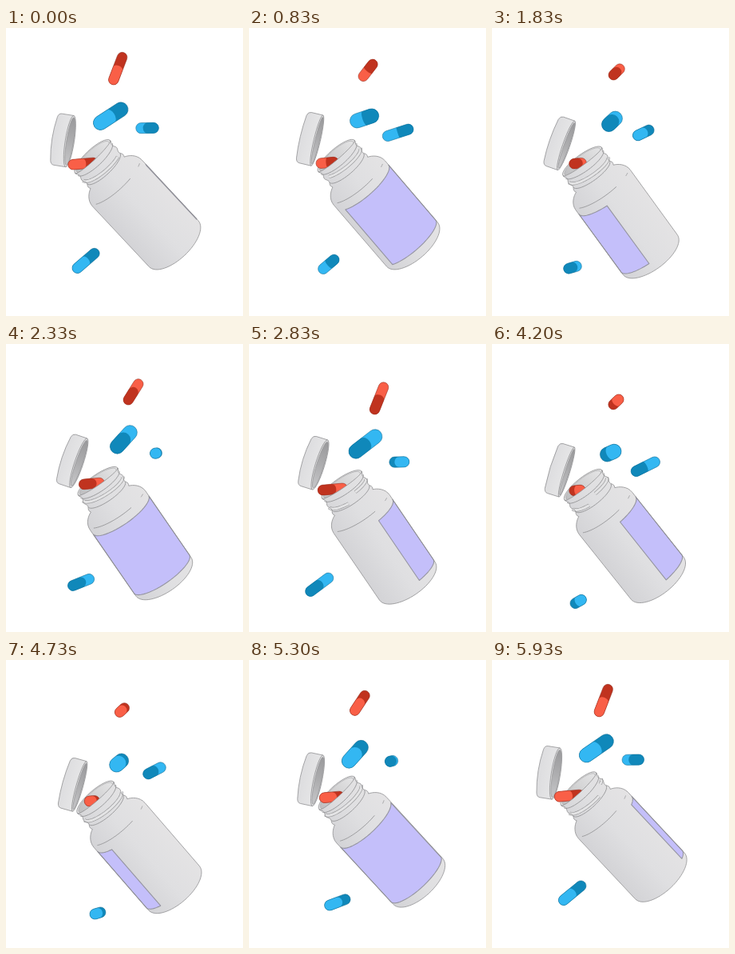
Animation of 297 by 360 pixels, one loop 6010 ms. Source, as an HTML page with a canvas:

```html
<!DOCTYPE html>
<html lang="en">
<head>
<meta charset="utf-8">
<title>Pill bottle</title>
<style>
html, body { margin: 0; width: 100%; height: 100%; overflow: hidden; background: #fff; }
canvas { display: block; width: 297px; height: 360px; }
</style>
</head>
<body>
<canvas id="stage"></canvas>
<script>
const LOOP = 6010, STEPS = 120, DEG = Math.PI / 180;
const canvas = document.getElementById('stage');
const ctx = canvas.getContext('2d');
const ratio = Math.max(1, window.devicePixelRatio || 1);
canvas.width = 297 * ratio;
canvas.height = 360 * ratio;

const RED = { light: '#f95f47', dark: '#c0331f', line: '#8c2a1c' };
const BLUE = { light: '#33b7f2', dark: '#1088ba', line: '#0c668c' };
const LINE = '#8b8b8d';
const LABEL_WIDTH = 175, SQUASH = .3, LIP_SQUASH = .14;

const cos = deg => Math.cos(deg * DEG);
const sin = deg => Math.sin(deg * DEG);

// A closed sway: one swing per loop plus a smaller one at double speed.
const wave = (mid, size, phase, size2 = 0, phase2 = 0) => turn =>
  mid + size * cos(turn - phase) + size2 * cos(2 * turn - phase2);

// Pills drift along x and y, tumble end over end and rock around their tilt.
const PILLS = [
  { hue: RED, r: 6.3, len: 30, lag: 0, seam: 35, tilt: wave(55, 0, 0, 14, 0),
    x: wave(152, 12, 170, 3, 90), y: wave(60.5, 12, 215, 4, 90) },
  { hue: BLUE, r: 9, len: 30.5, lag: 0, seam: 35, tilt: wave(33, 0, 0, 15, 270),
    x: wave(143.5, 8, 160, 5.5, 150), y: wave(121.5, 12, 225, 4, 135) },
  { hue: BLUE, r: 6.6, len: 27, lag: 55, seam: -125, tilt: wave(15, 0, 0, 14, 180),
    x: wave(186.5, 6, 175, 4.5, 140), y: wave(138, 15, 210, 7, 90) },
  { hue: BLUE, r: 6.5, len: 28, lag: 0, seam: 35, tilt: wave(31, 0, 0, 15, 50),
    x: wave(101, 8, 320, 7.5, 200), y: wave(303.5, 12, 240, 7, 160) }
];
const SPILLING = { hue: RED, r: 6.4, len: 25, lag: 0, seam: 35, tilt: wave(5, 0, 0),
  x: wave(103.5, 4, 200, 4, 220), y: wave(175, 9, 220, 3, 60) };

const CAP = {
  x: wave(88.5, 4.5, 190, 4.3, 190), y: wave(149.5, 9, 235, 2.8, 190),
  lean: wave(15.2, 4, 170, 2.3, 190), open: wave(4.8, 0, 0, 1, -30), depth: 19
};

const BOTTLE = {
  x: wave(112.5, 4, 190), y: wave(169, 9.5, 213),
  footX: wave(207, 7.5, -39), footY: wave(286.5, 15, 201),
  wobble: wave(94, 12, 20, 15, 170), spinStep: 11.88
};

function paint(fill, line, width = .7) {
  if (fill) { ctx.fillStyle = fill; ctx.fill(); }
  if (line) { ctx.strokeStyle = line; ctx.lineWidth = width; ctx.stroke(); }
}

function shade(x0, y0, x1, y1, ...colours) {
  const g = ctx.createLinearGradient(x0, y0, x1, y1);
  colours.forEach((c, i) => g.addColorStop(i / (colours.length - 1), c));
  return g;
}

function oval(x, y, rx, ry) {
  ctx.beginPath();
  ctx.ellipse(x, y, rx, ry, 0, 0, 2 * Math.PI);
}

function drawPill({ hue, r, len, lag, seam, tilt, x, y }, turn) {
  const reach = len / 2 * cos(turn - lag);
  const depth = sin(turn - seam);
  const darkNear = depth > 0;
  const half = Math.abs(reach);
  const flipped = (reach < 0) === darkNear;
  ctx.save();
  ctx.translate(x(turn), y(turn));
  ctx.rotate(-tilt(turn) * DEG + (flipped ? Math.PI : 0));
  const capsule = () => {
    ctx.beginPath();
    ctx.arc(half, 0, r, -Math.PI / 2, Math.PI / 2);
    ctx.arc(-half, 0, r, Math.PI / 2, Math.PI * 1.5);
    ctx.closePath();
  };
  capsule();
  paint(darkNear ? hue.light : hue.dark);
  // The half nearer to the viewer covers the seam.
  ctx.beginPath();
  ctx.arc(half, 0, r, -Math.PI / 2, Math.PI / 2);
  ctx.ellipse(0, 0, r * Math.abs(depth), r, 0, Math.PI / 2, Math.PI * 1.5);
  ctx.closePath();
  paint(darkNear ? hue.dark : hue.light);
  capsule();
  paint(null, hue.line, .5);
  ctx.restore();
}

function drawCap(turn) {
  const h = 32.5, { depth } = CAP, open = CAP.open(turn);
  ctx.save();
  ctx.translate(CAP.x(turn), CAP.y(turn));
  ctx.rotate(CAP.lean(turn) * DEG);
  ctx.beginPath();
  ctx.moveTo(0, -h);
  ctx.lineTo(4 - depth, -h);
  ctx.quadraticCurveTo(-depth, -h, -depth - 1, -h + 5);
  ctx.quadraticCurveTo(-depth - open, 0, -depth - 1, h - 5);
  ctx.quadraticCurveTo(-depth, h, 4 - depth, h);
  ctx.lineTo(0, h);
  ctx.closePath();
  paint(shade(-depth, 0, 0, 0, '#dedee0', '#e6e6e7'), LINE);
  oval(0, 0, open, h);
  paint('#dcdcdd', LINE);
  oval(.4, 0, open - 1.3, h - 2.5);
  paint(shade(0, -h, 0, h, '#98989a', '#adadaf', '#c8c8ca'), '#8f8f91', .6);
  ctx.restore();
}

// Adds the part of a ring around the bottle between two angles; it may climb.
function ring(s, r, from, to, { squash = SQUASH, climb = 0 } = {}) {
  for (let i = 0; i <= 24; i++) {
    const a = from + (to - from) * i / 24;
    ctx.lineTo(r * sin(a), s + climb * (a - from) + squash * r * cos(a));
  }
}

function crease(s, r, from, to) {
  ctx.beginPath();
  ring(s, r, from, to);
  paint(null, '#9b9b9d', .9);
}

function bodySide(side) {
  // Neck with two ridges, shoulder, then the wall down to the rounded foot.
  const neck = s => 28.8 + 1.1 * cos(s * 30);
  for (let s = 0; s <= 27; s += 1.5) ctx.lineTo(side * neck(s), s);
  ctx.bezierCurveTo(side * 34, 29, side * 42.3, 35, side * 42.4, 45);
  ctx.lineTo(side * 42.2, 148);
  ctx.bezierCurveTo(side * 42, 160, side * 22, 168, 0, 168);
}

function bodyPath() {
  const path = side => {
    ctx.moveTo(0, 30 * LIP_SQUASH);
    ring(0, 30, 0, side * 90, { squash: LIP_SQUASH });
    bodySide(side);
    ctx.lineTo(0, 30 * LIP_SQUASH);
  };
  ctx.beginPath();
  path(-1);
  path(1);
}

function outlineBody() {
  ctx.beginPath();
  for (const side of [-1, 1]) {
    ctx.moveTo(0, 30 * LIP_SQUASH);
    ring(0, 30, 0, side * 90, { squash: LIP_SQUASH });
    bodySide(side);
  }
  paint(null, LINE);
}

// Calls show(from, to) for the parts of a turning band that face the viewer.
function facing(start, width, limit, show) {
  const first = ((start % 360) + 360) % 360;
  for (const a of [first - 360, first]) {
    const from = Math.max(-limit, a), to = Math.min(limit, a + width);
    if (to - from > 7) show(from, to, from - a);
  }
}

function drawThread(spin) {
  const climb = 7 / 330;
  facing(spin, 330, 88, (from, to, passed) => {
    ctx.beginPath();
    ring(9 + climb * passed, 29, from, to, { climb });
    paint(null, '#9b9b9d', 4.4);
    paint(null, '#e4e4e5', 3);
  });
}

function drawLabel(spin) {
  facing(spin, LABEL_WIDTH, 90, (from, to) => {
    ctx.beginPath();
    ring(52, 42.2, from, to);
    ring(144, 42.2, to, from);
    ctx.closePath();
    paint('#c4bffa', '#9595a0', 1.1);
  });
}

function drawBottle(turn, n) {
  const x = BOTTLE.x(turn), y = BOTTLE.y(turn);
  const dx = BOTTLE.footX(turn) - x, dy = BOTTLE.footY(turn) - y;
  const length = Math.hypot(dx, dy), ax = dx / length, ay = dy / length, k = length / 152;
  const spin = BOTTLE.wobble(turn) + BOTTLE.spinStep * n - 8;
  const place = () => ctx.transform(ay, -ax, ax * k, ay * k, x, y);

  ctx.save();
  place();
  oval(0, 0, 30, 30 * SQUASH);
  paint('#e3e3e4', LINE);
  oval(0, .3, 27.5, 27.5 * SQUASH);
  paint(shade(-28, 0, 28, 0, '#bdbdbf', '#d2d2d3', '#e4e4e5'), '#a5a5a7', .6);
  ctx.restore();

  drawPill(SPILLING, turn);

  ctx.save();
  place();
  ctx.lineJoin = 'round';
  bodyPath();
  paint(shade(-43, 0, 43, 0, '#d3d3d6', '#dfdfe1', '#e4e3e4'));
  drawThread(spin);
  crease(4, 29.5, -88, 88);
  crease(20, 28, -88, 88);
  crease(40, 42.4, -62, 22);
  crease(40, 42.4, 52, 62);
  drawLabel(spin);
  outlineBody();
  ctx.restore();
}

function draw(n) {
  const turn = n * 360 / STEPS;
  ctx.setTransform(ratio, 0, 0, ratio, 0, 0);
  ctx.fillStyle = '#fff';
  ctx.fillRect(0, 0, 297, 360);
  drawCap(turn);
  drawBottle(turn, n);
  PILLS.forEach(pill => drawPill(pill, turn));
}

// Two steps per 100 ms: one holds 30 ms, the next 70 ms.
function stepAt(ms) {
  const t = ms % LOOP;
  return Math.min(STEPS - 1, 2 * Math.floor(t / 100) + (t % 100 >= 30 ? 1 : 0));
}

function tick() {
  draw(stepAt(performance.now()));
  requestAnimationFrame(tick);
}
tick();
</script>
</body>
</html>
```
